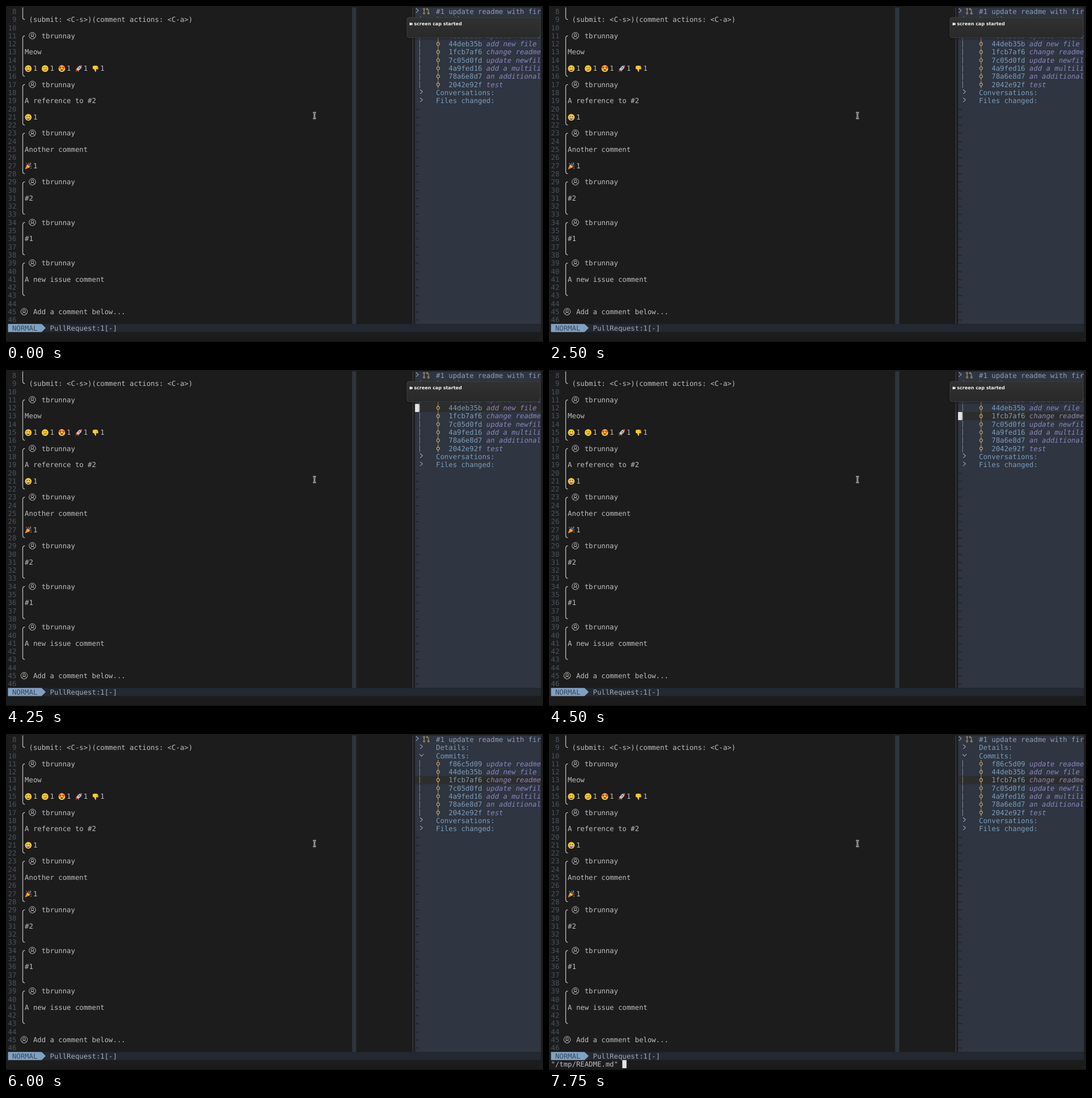
An HTML page with a canvas for the animation above (8 s loop, 947 by 592 pixels).

```html
<!DOCTYPE html>
<html lang="en">
<head>
<meta charset="utf-8">
<title>Pull request review</title>
<style>
html, body { margin: 0; width: 100%; height: 100%; overflow: hidden; background: #1c1c1c; }
canvas { display: block; width: 947px; height: 592px; }
</style>
</head>
<body>
<canvas id="stage" width="947" height="592"></canvas>
<script>
const ctx = document.getElementById('stage').getContext('2d');
ctx.textRendering = 'geometricPrecision';

const LOOP = 8000;
const CELL_W = 7.4, CELL_H = 14.3, LEFT = 3.5, TOP = 2.5;
const FONT = '12.29px "DejaVu Sans Mono", monospace';
const USER = 'tbrunnay';
const C = {
  bg: '#1c1c1c', text: '#bcbdbe', number: '#4a5260', blue: '#7b9cba', title: '#8c9db2',
  purple: '#8d85bd', gold: '#c8a96c', side: '#2f3541', status: '#232831',
  accent: '#81a1c1', cursor: '#e4e4e4', face: '#fcc936', ink: '#5b4014'
};
const colX = col => LEFT + col * CELL_W;
const rowY = row => TOP + row * CELL_H;
const midY = row => rowY(row) + CELL_H / 2;

function rect(x, y, w, h, color) {
  ctx.fillStyle = color;
  ctx.fillRect(x, y, w, h);
}

// Places each character in its terminal cell.
function print(str, col, row, color = C.text, style = '') {
  ctx.font = style + FONT;
  ctx.fillStyle = color;
  [...str].forEach((ch, i) => {
    if (ch !== ' ') ctx.fillText(ch, colX(col + i), rowY(row) + 11.4);
  });
}

function stroke(path, color, width = 1) {
  ctx.strokeStyle = color;
  ctx.lineWidth = width;
  ctx.stroke(new Path2D(path));
}

function fill(path, color) {
  ctx.fillStyle = color;
  ctx.fill(new Path2D(path));
}

function disc(x, y, r, color) {
  ctx.fillStyle = color;
  ctx.beginPath();
  ctx.arc(x, y, r, 0, Math.PI * 2);
  ctx.fill();
}

function ring(x, y, r, color, width = 1) {
  ctx.strokeStyle = color;
  ctx.lineWidth = width;
  ctx.beginPath();
  ctx.arc(x, y, r, 0, Math.PI * 2);
  ctx.stroke();
}

function at(x, y, draw) {
  ctx.save();
  ctx.translate(x, y);
  draw();
  ctx.restore();
}

function avatar(x, row) {
  at(x, midY(row) - 0.2, () => {
    ring(0, 0, 5.8, C.text);
    ring(0, -1.2, 2.3, C.text);
    stroke('M-3.7 4.3C-3.2 .2 3.2 .2 3.7 4.3', C.text);
  });
}

function bracket(first, last, open = true) {
  const x = 29.5, end = midY(last) - 0.2, start = midY(first);
  const head = open ? `M33.3 ${start}Q${x} ${start} ${x} ${start + 4}` : `M${x} ${rowY(first)}`;
  stroke(`${head}V${end - 4}Q${x} ${end} 33.3 ${end}`, C.text, 1.3);
}

const eyes = color => { disc(-2, -1.4, 0.9, color); disc(2, -1.4, 0.9, color); };
const emoji = {
  grin() {
    disc(0, 0, 5.9, C.face);
    eyes(C.ink);
    fill('M-3.7 .8H3.7C3.2 5.3 -3.2 5.3 -3.7 .8Z', C.ink);
    rect(-3, 0.9, 6, 1.2, '#fff');
  },
  confused() {
    disc(0, 0, 5.9, C.face);
    eyes(C.ink);
    stroke('M-2.2 3.4Q0 1.4 3 2.2', C.ink, 1.1);
  },
  love() {
    disc(0, 0, 5.9, C.face);
    for (const x of [-3, 3])
      at(x, -1.8, () => fill('M0 2.5C-4.2 -.4 -2.3 -3.6 0 -1.7C2.3 -3.6 4.2 -.4 0 2.5Z', '#ef4338'));
    fill('M-2.7 1.6H2.7C2.3 4.8 -2.3 4.8 -2.7 1.6Z', C.ink);
  },
  rocket() {
    fill('M-2 -1.5L-5 .4L-5.2 2.4L-1.7 1.5ZM1.7 2L.3 5.3L-1.8 5.5L-1.2 1.8Z', '#d83b3b');
    fill('M5.7 -5.7C1 -5.7 -2.2 -2.6 -3.7 1.8L-1.8 3.7C2.7 2.2 5.7 -1 5.7 -5.7Z', '#bcc8cf');
    fill('M5.7 -5.7L2.4 -5Q3.1 -3 5 -2.3Z', '#d83b3b');
    disc(1.2, -1.2, 1.3, '#3d6f8c');
    fill('M-3.3 2.2L-5.8 5.8L-2.2 3.3Z', '#f7a51d');
  },
  down() {
    fill('M-4.8 -4.3Q0 -6.2 4 -4.4Q5.4 -1.4 4.8 1.2H.9L1.3 4.2Q.8 6.4 -.6 5.2L-2.1 1.6L-4.8 .4Z', C.face);
    stroke('M1.8 -2.9H4.3M1.8 -1H4.8M1.5 .9H4.6', '#c98a1a', 0.6);
  },
  party() {
    fill('M-5.8 5.8L-2.5 -2.6Q2 -1 2.7 2.4Z', '#f6b62c');
    stroke('M-3.7 .8L-.6 4M-4.8 3.3L-3 5', '#d8563b', 1.2);
    stroke('M0 -1.7Q1.6 -3.4 .3 -5.6M1.8 1Q3.2 -.6 5.7 .5', '#e85a6a', 1.1);
    stroke('M1 -.6Q2.2 -3.3 5 -3.7', '#4fa8e0', 1.1);
    disc(-3.5, -4.4, 0.9, '#e8504a');
    disc(3.8, -5.2, 0.8, '#f6c244');
    disc(4.8, 3.8, 0.9, '#6bb84a');
    disc(-0.8, -3.5, 0.7, '#6bb84a');
  }
};

function reactions(row, names) {
  names.forEach((name, i) => {
    const col = 4 + i * 4;
    at(colX(col) + 6.2, midY(row) + 0.5, emoji[name]);
    print('1', col + 2, row);
  });
}

function comment(first, last, body, names) {
  bracket(first, last);
  avatar(46.5, first);
  print(USER, 8, first);
  print(body, 4, first + 2);
  if (names) reactions(first + 4, names);
}

function editor() {
  rect(colX(82), TOP, CELL_W, CELL_H * 39, '#2e353c');
  for (let row = 0; row < 39; row++) print(String(row + 8).padStart(2), 0, row, C.number);
  bracket(0, 1, false);
  print('(submit: <C-s>)(comment actions: <C-a>)', 5, 1);
  comment(3, 8, 'Meow', ['grin', 'confused', 'love', 'rocket', 'down']);
  comment(9, 14, 'A reference to #2', ['grin']);
  comment(15, 20, 'Another comment', ['party']);
  comment(21, 25, '#2');
  comment(26, 30, '#1');
  comment(31, 35, 'A new issue comment');
  avatar(32, 37);
  print('Add a comment below...', 6, 37);
}

function chevron(x, row) {
  stroke(`M${x} ${midY(row) - 5.4}l4.2 3.8l-4.2 3.8`, '#98a4b3', 1.1);
}

function commitIcon(row) {
  const x = 762, y = midY(row);
  stroke(`M${x} ${y - 6.5}V${y - 2.7}M${x} ${y + 2.7}V${y + 6.5}`, C.gold, 1.1);
  ring(x, y, 2.5, C.gold, 1.1);
}

function pullIcon() {
  at(741, midY(0) - 0.6, () => {
    for (const [x, y] of [[-3.7, -3.7], [-3.7, 3.9], [4, 3.9]]) ring(x, y, 1.4, C.gold);
    stroke('M-3.7 -2.2V2.4M4 2.4V-1.8Q4 -3.7 2 -3.7H.4M2.4 -5.7L.3 -3.7L2.4 -1.7', C.gold);
  });
}

const commits = [
  ['f86c5d09', 'update readme'], ['44deb35b', 'add new file'], ['1fcb7af6', 'change readme'],
  ['7c05d0fd', 'update newfil'], ['4a9fed16', 'add a multili'], ['78a6e8d7', 'an additional'],
  ['2042e92f', 'test']
];

function sidebar(cursorRow, cursorOn) {
  const x = colX(97), width = CELL_W * 30;
  rect(717, TOP, 1, CELL_H * 39, '#4a4458');
  rect(x, TOP, width, CELL_H * 39, C.side);
  rect(x, rowY(cursorRow), width, CELL_H, '#2d2d2c');
  chevron(723, 0);
  pullIcon();
  print('#1 update readme with fir', 102, 0, C.title);
  chevron(730.3, 1);
  print('Details:', 102, 1, C.blue);
  stroke(`M729 ${midY(2) - 2.8}l3.7 3.7l3.7 -3.7`, '#98a4b3', 1.1);
  print('Commits:', 102, 2, C.blue);
  commits.forEach(([hash, message], i) => {
    const row = i + 3;
    rect(729, rowY(row) + 0.7, 1, 12.8, '#7d8793');
    commitIcon(row);
    print(hash, 105, row, C.blue);
    print(message, 114, row, C.purple, 'italic ');
  });
  chevron(730.3, 10);
  print('Conversations:', 102, 10, C.blue);
  chevron(730.3, 11);
  print('Files changed:', 102, 11, C.blue);
  for (let row = 12; row < 39; row++) print('~', 97, row, C.bg);
  if (cursorOn) rect(x, rowY(cursorRow), CELL_W, CELL_H, C.cursor);
}

function statusLine() {
  const y = rowY(39), tip = colX(8);
  rect(LEFT, y, CELL_W * 127, CELL_H, C.status);
  rect(LEFT, y, tip - LEFT, CELL_H, C.accent);
  fill(`M${tip - 0.5} ${y}h.5l7.4 ${CELL_H / 2}l-7.4 ${CELL_H / 2}h-.5Z`, C.accent);
  print('NORMAL', 1, 39, '#34475c');
  print('PullRequest:1[-]', 10, 39, '#a3a9b2');
}

function notification() {
  ctx.save();
  ctx.shadowColor = 'rgba(0,0,0,.6)';
  ctx.shadowBlur = 4;
  ctx.shadowOffsetY = 1;
  const shade = ctx.createLinearGradient(0, 20, 0, 56);
  shade.addColorStop(0, '#313131');
  shade.addColorStop(1, '#292929');
  ctx.fillStyle = shade;
  ctx.beginPath();
  ctx.roundRect(707, 20, 235, 36, 4);
  ctx.fill();
  ctx.restore();
  ctx.strokeStyle = '#484848';
  ctx.lineWidth = 0.8;
  ctx.stroke();
  fill('M711.7 29.4h3.4v1.2l1.8-.9v4l-1.8-.9v1.2h-3.4Z', '#e8e8e8');
  ctx.font = 'bold 8px "DejaVu Sans", sans-serif';
  ctx.fillStyle = '#f0f0f0';
  ctx.fillText('screen cap started', 719.6, 34.4);
}

function pointer() {
  const beam = 'M541.5 188h1.5l1 1l1 -1h1.5M544 189v8M541.5 198h1.5l1 -1l1 1h1.5';
  stroke(beam, '#e6e6e6', 2.6);
  stroke(beam, '#222', 0.9);
}

const blinkTimes = [5250, 5750, 6000, 6500, 7000, 7250, 7500];

function render(t) {
  const cursorRow = t < 4000 ? 2 : t < 4250 ? 3 : t < 4500 ? 4 : 5;
  const cursorOn = blinkTimes.filter(time => t >= time).length % 2 === 0;
  rect(0, 0, 947, 592, C.bg);
  rect(0, 590, 947, 2, '#1b1217');
  editor();
  sidebar(cursorRow, cursorOn);
  statusLine();
  if (t < 5000) notification();
  if (t >= 7750) {
    print('"/tmp/README.md"', 0, 40);
    rect(colX(17), rowY(40), CELL_W, CELL_H, C.cursor);
  }
  pointer();
}

const start = performance.now();
function tick() {
  render((performance.now() - start) % LOOP);
  requestAnimationFrame(tick);
}
tick();
</script>
</body>
</html>
```
